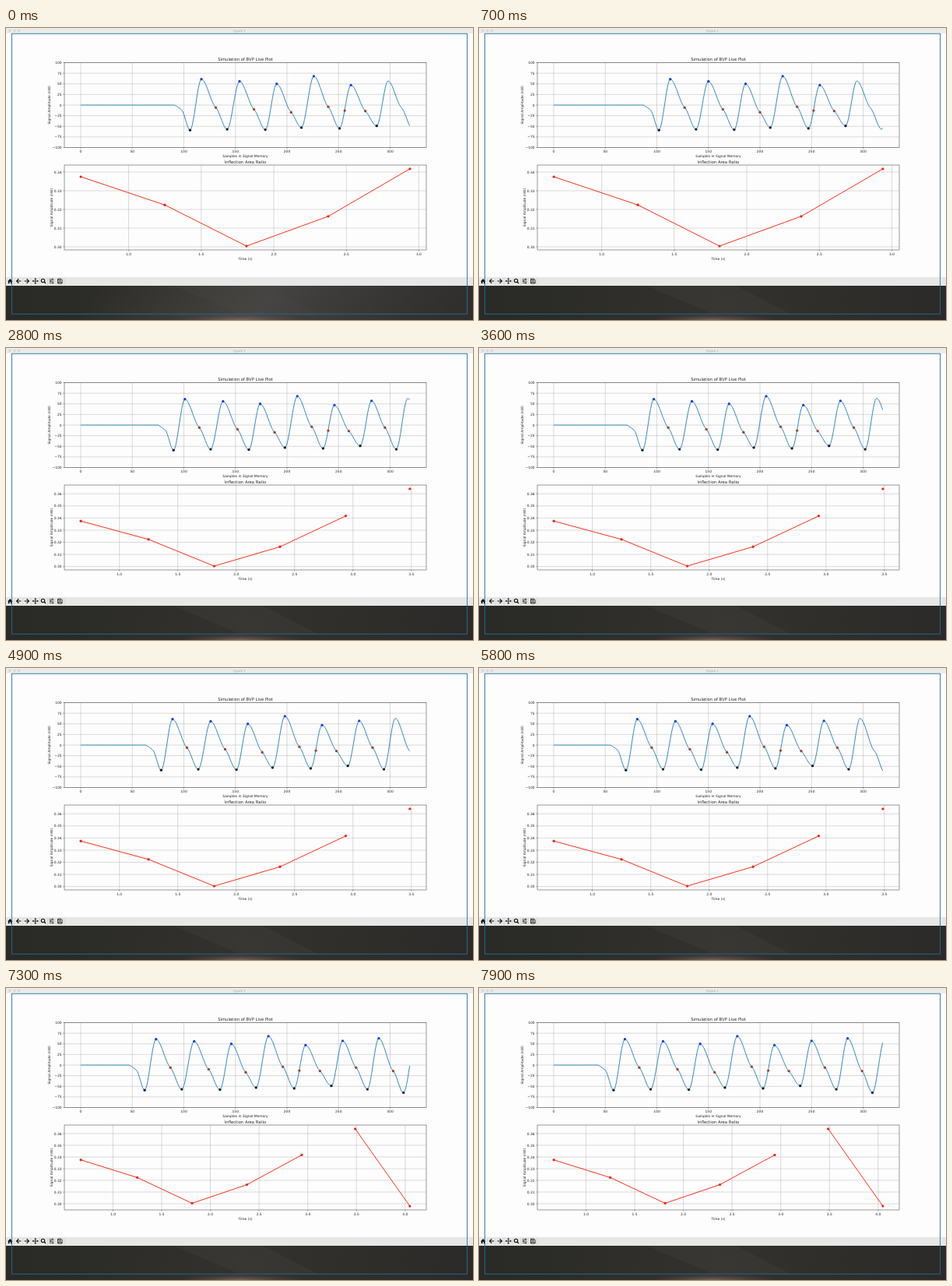
Recreate the animation shown at these times as an HTML page. Size 600 px wide and 375 px high, loop 8000 ms.

```html
<!DOCTYPE html>
<html lang="en">
<head>
<meta charset="utf-8">
<title>Live plot</title>
<style>
  html, body { margin: 0; width: 100%; height: 100%; overflow: hidden; background: #2c2b29; }
  svg { display: block; width: 100vw; height: 100vh; }
  text { font-family: "DejaVu Sans", sans-serif; font-size: 4.4px; fill: #222; text-rendering: geometricPrecision; }
  .title { font-size: 5.27px; }
  .mid { text-anchor: middle; }
  .end { text-anchor: end; }
  .grid { stroke: #b4b4b4; stroke-width: .5; fill: none; }
  .tick { stroke: #444; stroke-width: .5; fill: none; }
  .spine { stroke: #555; stroke-width: .6; fill: none; }
  .wave { stroke: #2b84b8; stroke-width: .95; fill: none; stroke-linejoin: round; }
  .ratio { stroke: #f5301c; stroke-width: 1; fill: none; }
  .icons { fill: none; stroke: #111; stroke-width: 1.1; }
  .icons .solid { fill: #111; stroke: none; }
</style>
</head>
<body>
<svg viewBox="0 0 600 375" preserveAspectRatio="none">
  <defs>
    <linearGradient id="night">
      <stop offset="0" stop-color="#2a2a27"/><stop offset=".5" stop-color="#302f2b"/>
      <stop offset="1" stop-color="#2b2a28"/>
    </linearGradient>
    <linearGradient id="haze" x1="0" x2="1" y1="0" y2=".06">
      <stop offset=".2" stop-color="#4b4947" stop-opacity="0"/>
      <stop offset=".58" stop-color="#4b4947" stop-opacity=".8"/>
      <stop offset="1" stop-color="#3b3a39" stop-opacity=".3"/>
    </linearGradient>
    <radialGradient id="glow">
      <stop offset="0" stop-color="#8a7564" stop-opacity=".75"/>
      <stop offset="1" stop-color="#5a4c42" stop-opacity="0"/>
    </radialGradient>
  </defs>

  <rect y="330" width="600" height="45" fill="url(#night)"/>
  <path d="M215 331H330L400 367H300Z" fill="#45433f" opacity=".3"/>
  <rect id="mist" y="330" width="600" height="45" fill="url(#haze)"/>
  <ellipse cx="300" cy="375" rx="85" ry="8" fill="url(#glow)"/>

  <rect width="600" height="331" fill="#fdfdfd"/>
  <rect width="600" height="7" fill="#ebebeb"/>
  <g fill="#d2d2d2"><circle cx="5" cy="3.3" r="1.6"/><circle cx="11" cy="3.3" r="1.6"/><circle cx="16.5" cy="3.3" r="1.6"/></g>
  <text class="mid" x="300" y="4.9" style="font-size:4px;fill:#aaa">Figure 1</text>

  <rect y="319.8" width="600" height="11.2" fill="#e7e7e7"/>
  <path d="M10.7 320.5v10M21.4 320.5v10M32.1 320.5v10M42.8 320.5v10M53.4 320.5v10M64 320.5v10M74.7 320.5v10" stroke="#cfcfcf" stroke-width=".6"/>
  <g class="icons">
    <path class="solid" d="M2 325.4L5.3 322L8.6 325.4H7.7V328.3H6V326H4.6V328.3H2.9V325.4Z"/>
    <path d="M19.3 325H13.8M16.4 322.2L13.6 325L16.4 327.8"/>
    <path d="M23.7 325H29.2M26.6 322.2L29.4 325L26.6 327.8"/>
    <path stroke-width=".8" d="M34.6 325H41M37.8 321.8V328.2"/>
    <path class="solid" d="M37.8 321l1.5 1.6h-3zM37.8 329l1.5-1.6h-3zM33.8 325l1.6-1.5v3zM41.8 325l-1.6-1.5v3z"/>
    <circle cx="47.5" cy="324.4" r="2.2"/><path d="M49.1 326L51 328"/>
    <path stroke-width=".7" d="M55.6 322.7H61.6M55.6 325H61.6M55.6 327.3H61.6"/>
    <path d="M59.7 321.8v1.8M57.2 324.1v1.8M60 326.4v1.8"/>
    <path stroke-width=".8" d="M66.5 322.2H70.8L72.1 323.5V328H66.5ZM67.8 322.2V324.2H70.3V322.2M67.8 328V326H70.8V328"/>
  </g>

  <g id="waveAxes"></g>
  <g id="wavePlot"></g>
  <g id="ratioPlot"></g>

  <rect x="7.5" y="7.3" width="585" height="360" fill="none" stroke="#226f99" stroke-width="1" opacity=".88"/>
</svg>

<script>
const LOOP = 8000;
const SHIFT_TIMES = [500, 900, 2100, 2700, 3300, 4000, 4600, 5200, 5800, 6400, 7100, 7700];
const LEFT = 75, RIGHT = 540;
const $ = id => document.getElementById(id);
const fix = n => +n.toFixed(2);

const line = (cls, x1, y1, x2, y2) => `<path class="${cls}" d="M${fix(x1)} ${fix(y1)}L${fix(x2)} ${fix(y2)}"/>`;
const label = (cls, x, y, s, extra = "") => `<text class="${cls}" x="${fix(x)}" y="${fix(y)}" ${extra}>${s}</text>`;
const dot = (x, y, color) => `<circle cx="${fix(x)}" cy="${fix(y)}" r="1.65" fill="${color}"/>`;
const path = (cls, pts) => `<path class="${cls}" d="M${pts.map(p => p.map(fix).join(" ")).join("L")}"/>`;

function axes({ top, bottom, xTicks, yTicks, title, xLabel, yLabelX }) {
  let out = "";
  for (const [x, s] of xTicks) {
    out += line("grid", x, top, x, bottom) + line("tick", x, bottom, x, bottom + 1.6)
      + label("mid", x, bottom + 6.6, s);
  }
  for (const [y, s] of yTicks) {
    out += line("grid", LEFT, y, RIGHT, y) + line("tick", LEFT - 1.6, y, LEFT, y)
      + label("end", LEFT - 3.4, y + 1.6, s);
  }
  const midX = (LEFT + RIGHT) / 2, midY = (top + bottom) / 2;
  return out
    + `<rect class="spine" x="${LEFT}" y="${top}" width="${RIGHT - LEFT}" height="${bottom - top}"/>`
    + label("title mid", midX, top - 2.5, title)
    + label("mid", midX, bottom + 12.8, xLabel)
    + label("mid", yLabelX, midY, "Signal Amplitude (nW)", `transform="rotate(-90 ${yLabelX} ${midY})"`);
}

// Pulse wave: [sample, value, kind]; samples count from the first trough.
const KNOTS = [
  [-15, 0, "start"], [-8, -12, "bend"],
  [0, -59, "low"], [11, 61, "high"], [25, -6, "bend"],
  [36, -57, "low"], [48, 56, "high"], [62, -10, "bend"],
  [73, -58, "low"], [84, 50, "high"], [98, -17, "bend"],
  [108, -53, "low"], [120, 68, "high"], [134, -4, "bend"],
  [145, -55, "low"], [156, 47, "high"], [170, -14, "bend"],
  [181, -49, "low"], [192, 57, "high"], [205, -6, "bend"],
  [216, -57, "low"], [227, 63, "high"], [241, -14, "bend"],
  [251, -65, "low"], [263, 62, "high"]
];
const SLOPE = { start: -1.3, bend: -2.1, low: 0, high: 0 };
const COLOR = { low: "#06142c", high: "#123fdc", bend: "#a0402f" };
const EXTRA_BEND = [150, -13, "bend"];
const MEMORY = 319;

const sx = s => 96 + s * 1.325;
const sy = v => 99 - v * .545;

function pulse(u) {
  const i = KNOTS.findIndex(k => k[0] > u);
  if (i < 1) return 0;
  const [u0, v0, k0] = KNOTS[i - 1], [u1, v1, k1] = KNOTS[i];
  const w = u1 - u0, t = (u - u0) / w, ease = t * t * (3 - 2 * t);
  return v0 + (v1 - v0) * ease
    + w * t * (1 - t) * (SLOPE[k0] * (1 - t) - SLOPE[k1] * t);
}

function drawWave(step) {
  const first = 106 - 4 * step;
  const marked = step < 2 ? 181 : step < 10 ? 216 : 251;
  const pts = [];
  for (let s = 0; s <= MEMORY; s++) pts.push([sx(s), sy(pulse(s - first))]);
  $("wavePlot").innerHTML = path("wave", pts)
    + [...KNOTS.slice(2), EXTRA_BEND].filter(k => k[0] <= marked)
      .map(([u, v, kind]) => dot(sx(u + first), sy(v), COLOR[kind])).join("");
}

// Ratio plot: limits follow the data with a 5 % margin.
const RATIOS = [[.67, .3375], [1.249, .3224], [1.812, .3004], [2.375, .3163], [2.938, .3417], [3.487, .364], [4.048, .298]];

function scale(values, from, to) {
  const lo = Math.min(...values), hi = Math.max(...values), pad = (hi - lo) * .05;
  const min = lo - pad, max = hi + pad;
  const at = v => from + (v - min) / (max - min) * (to - from);
  const ticks = (gap, digits) => {
    const list = [];
    for (let n = Math.ceil(min / gap); n * gap <= max; n++) list.push([at(n * gap), (n * gap).toFixed(digits)]);
    return list;
  };
  return { at, ticks };
}

function drawRatio(count) {
  const top = 176, bottom = 285, data = RATIOS.slice(0, count);
  const x = scale(data.map(p => p[0]), LEFT, RIGHT);
  const y = scale(data.map(p => p[1]), bottom, top);
  const pts = data.map(p => [x.at(p[0]), y.at(p[1])]);
  $("ratioPlot").innerHTML = axes({
    top, bottom, xTicks: x.ticks(.5, 1), yTicks: y.ticks(.01, 2),
    title: "Inflection Area Ratio", xLabel: "Time (s)", yLabelX: 59.6
  }) + path("ratio", pts.slice(0, 5))
    + (count > 6 ? path("ratio", pts.slice(5)) : "")
    + pts.map(p => dot(...p, "#f02414")).join("");
}

$("waveAxes").innerHTML = axes({
  top: 44.3, bottom: 153.6,
  xTicks: [0, 50, 100, 150, 200, 250, 300].map(s => [sx(s), s]),
  yTicks: [-100, -75, -50, -25, 0, 25, 50, 75, 100].map(v => [sy(v), String(v).replace("-", "\u2212")]),
  title: "Simulation of BVP Live Plot", xLabel: "Samples in Signal Memory", yLabelX: 57.5
});

const began = performance.now();
let shownStep = -1, shownCount = 0;

function render() {
  const t = (performance.now() - began) % LOOP;
  const step = SHIFT_TIMES.filter(at => at <= t).length;
  const count = step < 2 ? 5 : step < 10 ? 6 : 7;
  if (step !== shownStep) drawWave(shownStep = step);
  if (count !== shownCount) drawRatio(shownCount = count);
  $("mist").setAttribute("opacity", fix(Math.max(.12, Math.min(1, 1 - (t - 100) / 450))));
  requestAnimationFrame(render);
}
render();
</script>
</body>
</html>
```
